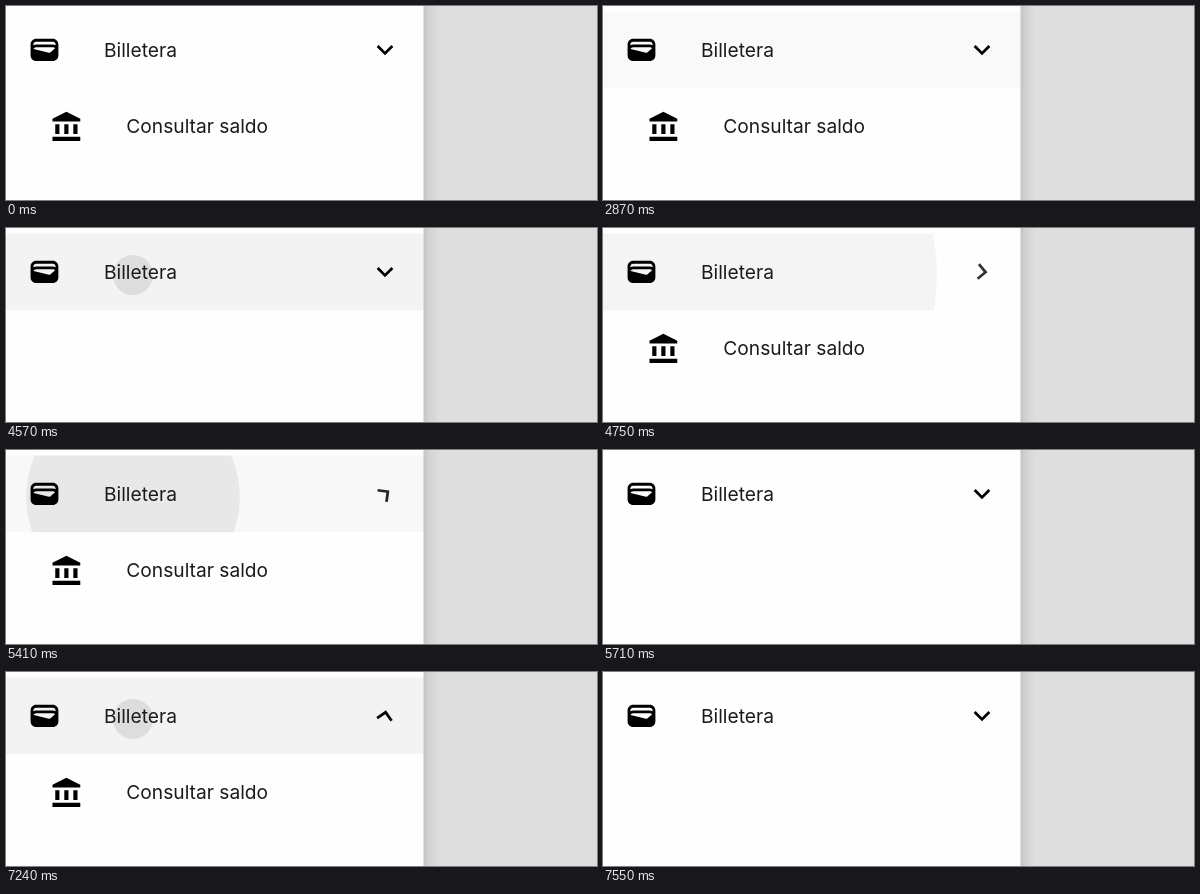
These frames come from a looping animation (591 by 194 pixels, 9.34 s). An HTML page:

```html
<!DOCTYPE html>
<html lang="es">
<head>
<meta charset="utf-8">
<style>
html, body { margin: 0; height: 100%; overflow: hidden; background: #dedede }
svg { display: block }
text { font: 19.2px Inter, sans-serif; fill: #1a1a1a }
</style>
</head>
<body>
<svg width="591" height="194">
  <defs>
    <linearGradient id="shade">
      <stop stop-color="#c3c3c3"/>
      <stop offset=".4" stop-color="#d3d3d3"/>
      <stop offset="1" stop-color="#dedede"/>
    </linearGradient>
    <clipPath id="row"><path d="M0 5.5H417.5V82.3H0z"/></clipPath>
  </defs>
  <rect x="417" width="16" height="194" fill="url(#shade)"/>
  <rect width="417.5" height="194" fill="#fefefe"/>
  <g clip-path="url(#row)">
    <rect id="glow" width="418" height="90" fill-opacity=".045"/>
    <circle id="ripple" cx="127" cy="47"/>
  </g>
  <path transform="translate(21.8 27.3) scale(1.39)" fill-rule="evenodd" d="M18 4H6C3.79 4 2 5.79 2 8v8c0 2.21 1.79 4 4 4h12c2.21 0 4-1.79 4-4V8c0-2.21-1.79-4-4-4zm-1.86 9.77c-.24.2-.57.28-.88.2L4.15 11.25C4.45 10.52 5.16 10 6 10h12c.67 0 1.26.34 1.63.84l-3.49 2.93zM6 6h12c1.1 0 2 .9 2 2v.55c-.59-.34-1.27-.55-2-.55H6c-.73 0-1.41.21-2 .55V8c0-1.1.9-2 2-2z"/>
  <text x="98" y="50.5">Billetera</text>
  <path id="chevron" d="M16.59 8.59L12 13.17 7.41 8.59 6 10l6 6 6-6z"/>
  <g id="child">
    <path transform="translate(43.7 104.3) scale(1.39)" d="M4 10h3v7H4zM10.5 10h3v7h-3zM2 19h20v3H2zM17 10h3v7h-3zM12 1L2 6v2h20V6z"/>
    <text x="120.3" y="127.3">Consultar saldo</text>
  </g>
</svg>
<script>
const LOOP = 9340, UP = -170;
// first: the phase at which a tap begins; phase 0 is finger down
const taps = [
  { start: 2870, end: 3080, steps: 3, first: -1, from: 0, to: 0, open: false },
  { start: 4570, end: 4890, steps: 4, first: 0, from: 0, to: UP, open: true },
  { start: 5260, end: 5710, steps: 6, first: -1, from: UP, to: 0, open: false },
  { start: 6430, end: 6740, steps: 4, first: 0, from: 0, to: UP, open: true },
  { start: 7160, end: 7550, steps: 5, first: -1, from: UP, to: 0, open: false }
];
const el = id => document.getElementById(id);
const glow = el('glow'), ripple = el('ripple'), chevron = el('chevron'), child = el('child');
const clamp = v => Math.max(0, Math.min(1, v));

function draw(t) {
  let open = true, angle = 0, light = 0, radius = 0, alpha = 0;
  const tap = taps.findLast(p => t >= p.start);
  if (tap) {
    const { start, end, steps, first, from, to } = tap;
    const step = Math.min(steps, Math.floor((t - start) / (end - start) * steps + 1e-6));
    const phase = first + step, done = step === steps;
    open = phase >= (tap.open ? 1 : 2) ? tap.open : !tap.open;
    angle = from + (to - from) * clamp(phase / 4);
    if (!done) {
      light = phase < 0 ? .4 : clamp(1 - phase / 2);
      radius = phase < 0 ? 0 : 20 + 80 * phase + 6.75 * phase * phase;
      alpha = Math.max(0, .09 - .025 * phase);
    }
  }
  glow.setAttribute('opacity', light);
  ripple.setAttribute('r', radius);
  ripple.setAttribute('opacity', alpha);
  chevron.setAttribute('transform', `translate(379 43.8) rotate(${angle}) scale(1.39) translate(-12 -12)`);
  chevron.setAttribute('opacity', 1 - .2 * Math.sin(Math.PI * angle / -180));
  child.setAttribute('visibility', open ? 'visible' : 'hidden');
}

const begin = performance.now();
function tick() {
  draw((performance.now() - begin) % LOOP);
  requestAnimationFrame(tick);
}
tick();
</script>
</body>
</html>
```
